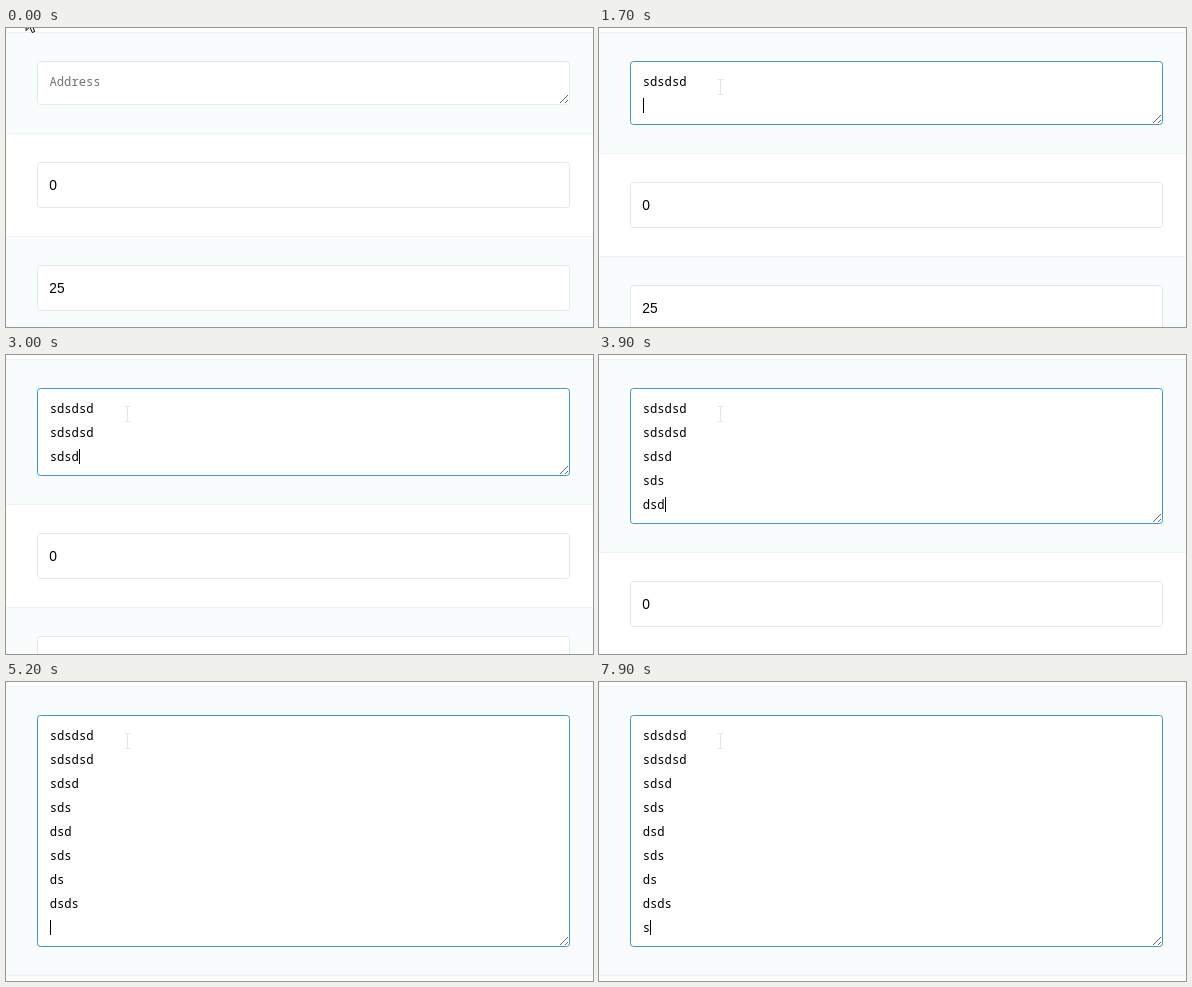
An HTML page for the animation above (8000 ms loop, 587 px wide and 299 px high).

```html
<!DOCTYPE html>
<html lang="en">
<head>
<meta charset="utf-8">
<title>Growing text field</title>
<style>
html, body { margin: 0; width: 100%; height: 100%; overflow: hidden; background: #fff; }
svg { display: block; }
.tint { fill: #f8fcfd; }
.rule { fill: #eef2f3; }
.field { fill: #fff; stroke: #e6e9ea; }
.mono { font: 12.2px "Noto Sans Mono", monospace; white-space: pre; }
.num { font: 13.8px "Liberation Sans", Arial, sans-serif; }
</style>
</head>
<body>
<svg width="587" height="299" viewBox="0 0 587 299">
  <rect class="tint" y="4" width="587" height="400"/>
  <rect class="rule" y="4" width="587" height="1"/>
  <!-- everything below the text area; y = 0 is its bottom edge -->
  <g id="below">
    <rect y="28" width="587" height="103" fill="#fff"/>
    <rect class="rule" y="28" width="587" height="1"/>
    <rect class="rule" y="131" width="587" height="1"/>
    <rect class="field" x="31.5" y="57.5" width="532" height="45" rx="3"/>
    <text class="num" x="43.3" y="85">0</text>
    <rect class="field" x="31.5" y="160.5" width="532" height="45" rx="3"/>
    <text class="num" x="43.3" y="188">25</text>
  </g>
  <rect id="area" class="field" x="31.5" y="33.5" width="532" rx="3"/>
  <path id="grip" d="M554 -2L562 -10M559 -2L562 -5" stroke="#666"/>
  <text id="hint" class="mono" x="43.5" y="58" fill="#757575">Address</text>
  <g id="lines"></g>
  <rect id="caret" width="1" height="15"/>
  <path id="arrow" d="M.5 .5V16.5L4.3 13L6.8 18.5L9.2 17.5L6.9 12H11.5Z" fill="#fff" stroke="#000"/>
  <path id="beam" d="M-3 -7.5H3M0 -7.5V7.5M-3 7.5H3" fill="none" stroke="#e6e6e6"/>
</svg>
<script>
const $ = id => document.getElementById(id);
const LOOP = 8000, LEFT = 43.7, CHAR = 7.33, TOP = 33, ROW = 24;

// Tenths of a second, then the keys pressed: "/" is Enter, "-" is Backspace
const keys = ("9s 10d 11s 12d 14s 15d 17/ 19s 20d 21s 22d 23s 24d 26/ 27s 29d 30sd 32/ " +
  "33s 34d 35s 36/ 37ds 39d 41/ 42s 43ds 44/ 45d 46s 47/ 48ds 50d 52s/ " +
  "54s 55d 56s 57d 58s 59d 61/ 65- 69- 71- 72- 77- 79-")
  .split(" ").map(k => [parseInt(k), k.replace(/\d+/, "")]);

// Pointer position at each of the first tenths
const pointer = [[19.5, -14], [62, 18], [131, 87], [127, 72], [121.5, 59]];

const rows = Array.from({ length: 10 }, (_, i) => {
  const row = document.createElementNS("http://www.w3.org/2000/svg", "text");
  row.setAttribute("class", "mono");
  row.setAttribute("x", LEFT);
  row.setAttribute("y", 58 + ROW * i);
  $("lines").append(row);
  return row;
});

function typed(tick) {
  let text = "";
  for (const [at, chars] of keys) {
    if (at > tick) break;
    for (const c of chars) text = c === "-" ? text.slice(0, -1) : text + c;
  }
  return text;
}

const show = (id, on) => $(id).style.display = on ? "" : "none";
const move = (id, x, y) => $(id).setAttribute("transform", `translate(${x} ${y})`);

function draw(tick) {
  const text = typed(tick), lines = text.split("/"), n = lines.length;
  const height = Math.max(44, 16 + ROW * n);
  rows.forEach((row, i) => row.textContent = lines[i] || "");
  show("hint", !text);

  $("area").setAttribute("height", height - 1);
  $("area").style.stroke = tick < 6 ? "" : tick < 7 ? "#8fbfe0" : "#3f95d3";
  move("below", 0, TOP + height);
  move("grip", 0, TOP + height);

  show("caret", tick >= 6 && tick !== 76);
  move("caret", Math.round(LEFT + CHAR * lines[n - 1].length), 46 + ROW * (n - 1));

  const [x, y] = pointer[Math.min(tick, 4)];
  show("arrow", tick < 3);
  show("beam", tick >= 3);
  move("arrow", x, y);
  move("beam", x, y);
}

function frame() {
  draw(Math.floor(performance.now() % LOOP / 100));
  requestAnimationFrame(frame);
}
frame();
</script>
</body>
</html>
```
